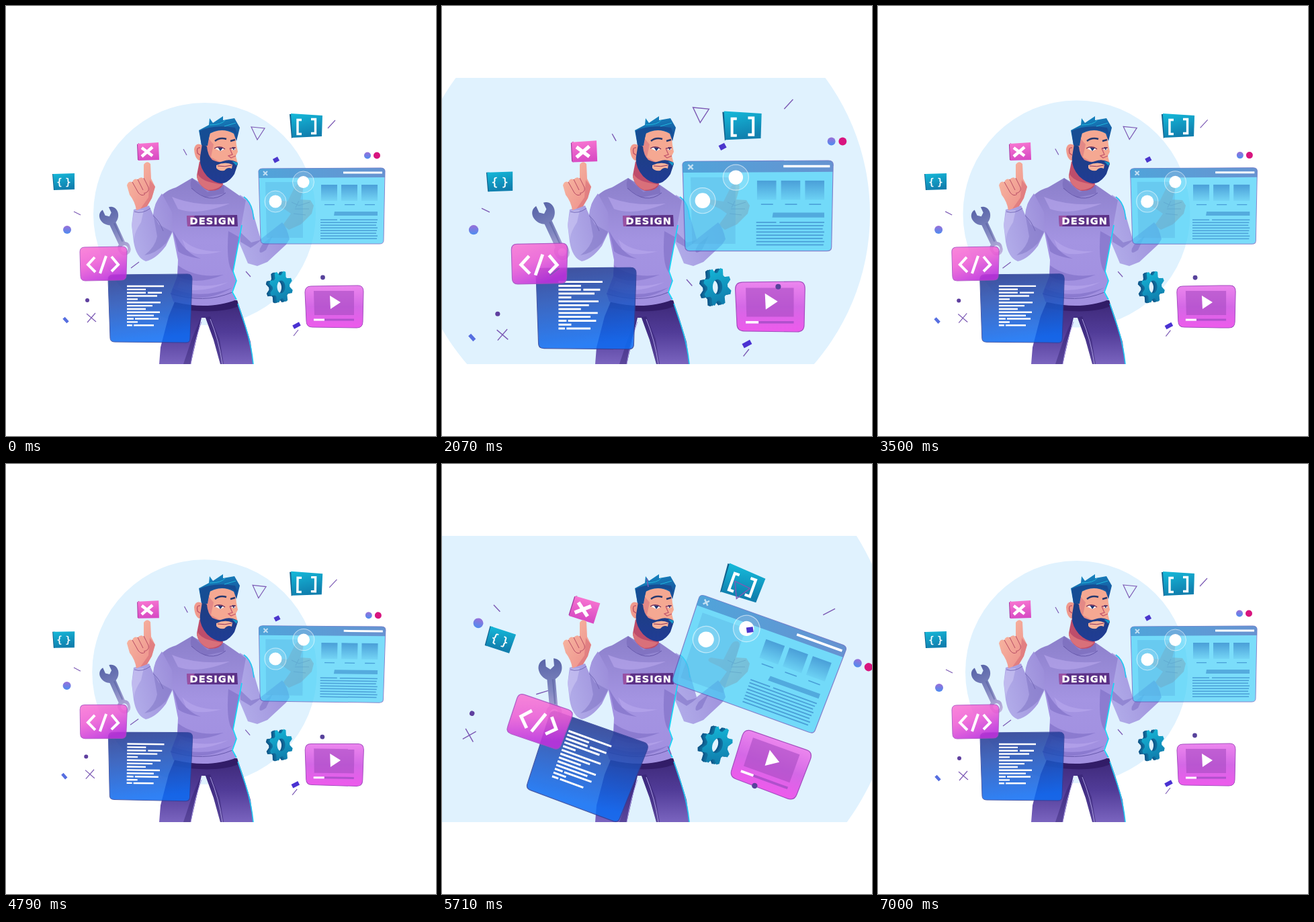
These frames come from a looping animation (640 px wide and 640 px high, 7210 ms). An HTML page:

```html
<!DOCTYPE html>
<html lang="en">
<head>
<meta charset="utf-8">
<title>Design</title>
<style>
html, body { margin: 0; width: 100%; height: 100%; overflow: hidden; background: #fff; }
svg { display: block; width: 100vw; height: 100vh; }
text { font-family: "DejaVu Sans", sans-serif; fill: #fff; }
.ln { fill: none; stroke: #7d5bb5; stroke-width: 1.2; }
.wh { fill: none; stroke: #fff; }
</style>
</head>
<body>
<svg viewBox="0 0 640 640">
<defs>
  <clipPath id="stage"><path d="M0 107H640V533H0Z"/></clipPath>
  <linearGradient id="sweater" x2="0" y2="1"><stop stop-color="#8b7fca"/><stop offset=".5" stop-color="#a494e2"/><stop offset="1" stop-color="#a18fe0"/></linearGradient>
  <linearGradient id="sleeve" x1="1" x2="0" y2=".4"><stop stop-color="#9a8bd9"/><stop offset="1" stop-color="#b0aae8"/></linearGradient>
  <linearGradient id="pants" x2="0" y2="1"><stop stop-color="#3c2776"/><stop offset=".5" stop-color="#513c98"/><stop offset="1" stop-color="#7a64bf"/></linearGradient>
  <linearGradient id="hair" x2=".4" y2="1"><stop stop-color="#1591c8"/><stop offset="1" stop-color="#174b96"/></linearGradient>
  <linearGradient id="beard" x2="0" y2="1"><stop stop-color="#1d3f82"/><stop offset="1" stop-color="#203c94"/></linearGradient>
  <linearGradient id="skin" x2="1" y2="1"><stop stop-color="#f9bda4"/><stop offset="1" stop-color="#ec8d8a"/></linearGradient>
  <linearGradient id="teal" x2=".3" y2="1"><stop stop-color="#15bada"/><stop offset="1" stop-color="#107fae"/></linearGradient>
  <linearGradient id="pink" x2=".2" y2="1"><stop stop-color="#fa79d2"/><stop offset="1" stop-color="#d94cc4"/></linearGradient>
  <linearGradient id="tag" x2=".5" y2="1"><stop stop-color="#fb78d4"/><stop offset=".5" stop-color="#ee5fd6"/><stop offset="1" stop-color="#c030dc"/></linearGradient>
  <linearGradient id="video" x2="0" y2="1"><stop stop-color="#ec86ee"/><stop offset=".5" stop-color="#d468e6"/><stop offset="1" stop-color="#ee5aec"/></linearGradient>
  <linearGradient id="code" x2=".15" y2="1"><stop stop-color="#24338a"/><stop offset=".45" stop-color="#2050b8"/><stop offset="1" stop-color="#0c6cf4"/></linearGradient>
  <linearGradient id="bar"><stop stop-color="#4a9ad4"/><stop offset="1" stop-color="#6486ca"/></linearGradient>
  <linearGradient id="thumb" x2="0" y2="1"><stop stop-color="#4a9fd8"/><stop offset="1" stop-color="#4a9fd8" stop-opacity=".15"/></linearGradient>
  <linearGradient id="steel" x2="0" y2="1"><stop stop-color="#5965a8"/><stop offset=".5" stop-color="#8087c0"/><stop offset="1" stop-color="#c3b4e0"/></linearGradient>
  <linearGradient id="ball" x2="0" y2="1"><stop stop-color="#9a6fd8"/><stop offset="1" stop-color="#4d8df0"/></linearGradient>
</defs>
<g clip-path="url(#stage)">
  <circle id="disc" cx="295.5" cy="309.5" fill="#e0f2fe"/>

  <g data-pivot="163.5 334.5">
    <g transform="translate(164 335) rotate(-25)">
      <path fill="url(#steel)" fill-rule="evenodd" d="M-5 -37V-28L0 -24L5 -28V-37C12 -36 15 -30 14 -24C13 -18 9 -14 5 -12L5 20C9 22 10 26 9 30A9 9 0 0 1 -9 30C-10 26 -9 22 -5 20V-12C-9 -14 -13 -18 -14 -24C-15 -30 -12 -36 -5 -37ZM0 24A5 5 0 1 0 .1 24Z"/>
      <path d="M2 -12V18" stroke="#565f9f" stroke-width="2" opacity=".5"/>
    </g>
  </g>

  <g data-pivot="211.5 217">
    <path fill="#a3379f" d="M195 206L198 204V230L196 229Z"/>
    <path fill="url(#pink)" d="M196 205L227 203L228 229L197 230Z"/>
    <path class="wh" stroke-width="4.5" d="M202 211L218 223M218 210L202 224"/>
  </g>

  <g id="man">
    <path fill="url(#pants)" d="M252 438L344 438L353 464L364 500L368 533H319L309 497L297 464H291L283 498L275 533H228L230 508L242 462Z"/>
    <path fill="#2f1a63" d="M251 440L344 438L346 447C318 458 278 455 249 449Z" opacity=".8"/>
    <path fill="#2c1b66" opacity=".4" d="M291 464L297 464L309 497L319 533H324L318 496L304 462ZM290 464L276 497L264 533H275L283 498Z"/>
    <path fill="none" stroke="#20c8f0" stroke-width="1.6" d="M345 443L356 476Q365 503 368 533"/>
    <path fill="none" stroke="#a99be0" d="M304 466Q317 498 322 533M291 470Q281 497 275 533"/>

    <path fill="url(#skin)" d="M412 326L424 309L414 302L399 295Q393 291 400 288L419 291L428 273Q433 262 440 264Q445 266 441 277L438 288L453 289L458 297L455 309L439 325L421 333Z"/>
    <path fill="none" stroke="#bd5968" d="M425 292L436 297L452 292M430 302L451 302M428 309L446 311M436 290L431 300"/>
    <path fill="url(#sleeve)" d="M348 281Q361 287 366 302L379 347L411 322Q418 329 422 347L417 355L389 381L374 387L360 383L347 352L340 312Z"/>
    <path fill="#796bc2" opacity=".5" d="M348 336L365 352L380 348L373 354L364 360L349 351ZM382 354L397 342L387 363Q375 372 378 361Z"/>
    <path fill="none" stroke="#20c8f0" stroke-width="1.6" d="M354 284Q363 290 367 305L369 318"/>

    <path fill="url(#sweater)" d="M277 256L253 270Q232 276 223 294L219 315L247 333L256 378L255 402L245 428L249 440C278 448 315 449 343 437L336 426L343 410L338 397L347 344L357 289Q340 277 324 266L309 275Z"/>
    <path fill="#7667bf" opacity=".5" d="M249 335Q267 369 290 376Q266 373 256 365ZM256 386Q283 406 324 400Q281 417 255 402ZM248 420Q289 438 337 419Q300 443 247 430ZM331 335L347 344L338 397Q327 385 331 335Z"/>
    <path fill="#b9a9ee" opacity=".6" d="M247 284Q283 299 333 294Q285 313 256 302ZM262 347Q282 367 321 365Q283 375 268 362ZM259 409Q290 423 331 411Q291 430 255 419Z"/>
    <path fill="#7b6dbd" d="M277 256Q273 264 276 272L297 285L325 279L324 266L300 277Z" opacity=".7"/>
    <path fill="none" stroke="#6658ab" d="M276 271Q303 297 327 278M245 428Q294 444 337 426"/>
    <path fill="none" stroke="#12d8f6" stroke-width="1.6" d="M351 326L338 395L343 409L337 426L343 437"/>

    <path fill="url(#sleeve)" d="M232 279Q220 294 219 311L213 297L190 303L187 326L190 351Q194 375 208 380Q223 377 238 357L248 336L247 307Z"/>
    <path fill="#7f74c4" opacity=".5" d="M219 309L227 325L247 336L238 353Q222 369 206 371Q222 359 225 343Z"/>
    <path fill="#cbc7f4" opacity=".6" d="M191 305L205 304L201 322Q189 340 191 350L187 326Z"/>
    <path fill="none" stroke="#766bb9" d="M191 306Q203 310 215 301M219 312Q228 319 234 335"/>

    <path fill="url(#skin)" d="M205 236Q210 229 215 235L216 257L222 269L217 286L210 298L194 304Q192 291 184 281L180 267Q182 260 188 262Q190 256 196 258Q201 253 205 257Z"/>
    <path fill="#d96f78" opacity=".6" d="M214 259L222 269L217 286L210 298L200 302L212 285Z"/>
    <path fill="none" stroke="#b84d66" d="M188 262L197 278M196 258L204 274M205 256L212 270Q214 277 205 279M197 278Q202 284 207 280"/>

    <path fill="#be4d6b" d="M288 231L284 252Q286 269 302 275Q318 276 323 266L321 252Z"/>
    <path fill="#d9707a" d="M285 250Q291 260 307 263L322 266Q314 274 301 274Q287 268 284 255Z"/>
    <path fill="#f09a8d" d="M292 207Q282 202 280 213Q281 230 291 231Z"/>
    <path fill="none" stroke="#bd5368" stroke-width="1.4" d="M289 211Q283 210 285 219L289 222"/>
    <path fill="#f5a892" d="M298 187Q318 179 341 188L343 207L345 217L342 223L345 235L337 252L317 253L295 234Z"/>
    <path fill="#d8717c" opacity=".55" d="M298 193L309 206L305 225L318 232L304 238L292 222Z"/>
    <path fill="url(#beard)" d="M292 205L299 209Q300 222 307 229Q317 234 323 231Q333 227 343 232L345 235L340 250Q331 264 320 264Q309 263 299 253Q287 239 289 224Z"/>
    <path fill="#f6b39a" d="M313 237Q326 231 337 236L336 242Q330 239 325 245Q316 246 313 241Z"/>
    <path fill="none" stroke="#8f335e" d="M315 238Q326 240 336 237"/>
    <path fill="#1599c8" d="M336 231L345 233L343 238Q340 234 336 231Z"/>
    <path fill="url(#hair)" d="M287 185L302 177L303 167L308 174L323 164L323 170L340 167L348 181L343 201L339 190Q325 182 310 187L303 190L300 208L291 207Z"/>
    <path fill="#164d94" d="M288 186Q308 176 341 181L345 194L338 187Q318 181 304 189L299 208L291 207Z"/>
    <path fill="none" stroke="#20b6dc" d="M303 177Q321 177 326 170M325 179L342 174"/>
    <path fill="none" stroke="#24376e" stroke-width="2.5" d="M311 201Q318 195 328 198M334 201L341 199"/>
    <path fill="#fff" d="M311 212Q318 207 325 213L319 216ZM334 212Q338 208 342 212L339 215Z"/>
    <path fill="#263873" d="M315 210L323 211L319 216ZM336 210H341L339 215Z"/>
    <path fill="none" stroke="#7c355d" stroke-width="1.3" d="M310 212Q318 207 326 213M333 212L342 211"/>
    <path fill="none" stroke="#c3566d" stroke-width="1.3" d="M333 212L337 221L331 223L335 226L342 223"/>

    <path fill="#5c3187" d="M269 312L344 311L345 328L270 328Z"/>
    <path fill="#b35eae" opacity=".7" d="M269 312L281 312L274 328H270Z"/>
    <text x="273.5" y="325.4" font-size="14.5" font-weight="bold" letter-spacing="1.1" stroke="#fff" stroke-width=".35">DESIGN</text>
  </g>

  <g data-pivot="446.5 178.5">
    <path fill="#12608c" d="M422 161L427 161L428 194L425 197Z"/>
    <path fill="url(#teal)" d="M424 160L471 163L470 194L426 196Z"/>
    <path class="wh" stroke-width="3.4" d="M440 169.5H434V190.500H440M454 168.500H460.500V189.500H454"/>
  </g>

  <g data-pivot="85.5 262">
    <path fill="#12608c" d="M69 250L73 250L73 274L71 274Z"/>
    <path fill="url(#teal)" d="M70 250L102 249V273L72 274Z"/>
    <text x="88" y="266.500" font-size="14" text-anchor="middle" letter-spacing="4" stroke="#fff" stroke-width=".4">{}</text>
  </g>

  <g data-pivot="469.5 298">
    <path fill="#44d0f8" opacity=".7" stroke="#5a52b8" d="M382 242L558 241Q565 241 564 248L562 349Q562 354 556 354H385Q379 354 379 348L376 248Q375 242 382 242Z"/>
    <path fill="url(#bar)" opacity=".85" d="M382 242L558 241Q565 241 564 248V255L376 256V248Q375 242 382 242Z"/>
    <path class="wh" stroke-width="2" opacity=".65" d="M383 246L389 252M389 246L383 252"/>
    <path class="wh" stroke-width="3" d="M502 248H560"/>
    <path fill="#55a9db" opacity=".32" d="M386 262H442V345H388Z"/>
    <g id="page"></g>
    <path fill="#4a9fd8" opacity=".8" d="M489 306H553V312H488Z"/>
    <g fill="#fff">
      <circle cx="442.5" cy="262" r="9"/><circle cx="401" cy="291" r="9.5"/>
      <g fill-opacity=".13" stroke="#fff" stroke-opacity=".55"><circle cx="442.5" cy="262" r="16"/><circle cx="401" cy="291" r="16"/></g>
    </g>
  </g>

  <g data-pivot="214.5 450">
    <path fill="url(#code)" opacity=".85" stroke="#2d3f98" d="M159 400L270 399Q277 399 277 406L274 495Q274 501 268 501L162 500Q155 500 155 494L152 407Q152 400 159 400Z"/>
    <path id="lines" class="wh" stroke-width="2.4"/>
  </g>

  <g data-pivot="145 383.5">
    <path fill="url(#tag)" opacity=".88" stroke="#a94bc1" d="M117 359L173 358Q180 358 180 365L179 401Q179 408 172 408L118 409Q111 409 111 402L110 366Q110 359 117 359Z"/>
    <path class="wh" stroke-width="4" d="M132 374L122 385L133 396M149 372L140 398M157 373L167 385L157 395"/>
  </g>

  <g data-pivot="489 447.5">
    <path fill="url(#video)" stroke="#a54fc0" d="M454 417L524 416Q532 416 532 425L531 470Q531 479 522 479L456 478Q447 478 447 469L445 426Q445 417 454 417Z"/>
    <path fill="#a94bc4" opacity=".6" d="M458 424H518V460H459Z"/>
    <path fill="#fff" d="M482 431L498 441L483 451Z"/>
    <path stroke="#b050cc" stroke-width="3" d="M474 467H518"/>
    <path class="wh" stroke-width="3" d="M458 467H474"/>
  </g>

  <g data-pivot="407 418" id="gear"></g>
  <g id="bits" data-pivot="320.5 332"></g>
</g>
</svg>
<script>
const $ = id => document.getElementById(id);
const box = (x, y, w, h, fill) => `<rect x="${x}" y="${y}" width="${w}" height="${h}" fill="${fill}"/>`;

// Web page mock-up inside the window
const INK = '#4a9fd8';
let page = box(468, 317.5, 25, 1.5, INK) + box(497, 317.5, 56, 1.5, INK);
for (const x of [469, 499, 529])
  page += box(x, 266, 24, 24, 'url(#thumb)') + box(x + 5, 295, 15, 1.3, INK);
for (let i = 1; i < 8; i++)
  page += box(468, 317.5 + i * 4, 85 - i % 3, 1.5, INK);
$('page').innerHTML = page;

// Code lines: one or two strokes per row
const rows = [[0, 55], [0, 28], [0, 28, 31, 52], [0, 45], [0, 16], [0, 50], [0, 38],
  [0, 28], [0, 49], [0, 40], [0, 10, 12, 47], [0, 16], [0, 8, 10, 40]];
$('lines').setAttribute('d', rows.map((row, i) => {
  let d = '';
  for (let j = 0; j < row.length; j += 2)
    d += `M${180 + row[j]} ${417 + i * 4.85}H${180 + row[j + 1]}`;
  return d;
}).join(''));

// Gear: eight teeth, turned a little towards the side
function gearPath(cx, cy) {
  const pts = [];
  for (let i = 0; i < 32; i++) {
    const a = (i + .5) / 32 * Math.PI * 2 + .1, r = i % 4 < 2 ? 24 : 17.5;
    pts.push(`${(cx + Math.cos(a) * r * .73).toFixed(1)} ${(cy + Math.sin(a) * r).toFixed(1)}`);
  }
  return `M${pts.join('L')}ZM${cx} ${cy - 9.5}a6 9.5 0 1 0 .1 0Z`;
}
$('gear').innerHTML = [[404, 419, '#0d5488'], [405.5, 418.7, '#0e6091'], [407, 418.4, '#0f6c9b'], [409.5, 418, 'url(#teal)']]
  .map(([x, y, fill]) => `<path fill="${fill}" fill-rule="evenodd" d="${gearPath(x, y)}"/>`).join('');

// Loose shapes around the figure
const dot = (x, y, r, fill) => `<circle cx="${x}" cy="${y}" r="${r}" fill="${fill}"/>`;
const chip = (x, y, w, h, turn, fill) =>
  `<g transform="translate(${x} ${y}) rotate(${turn})">${box(-w / 2, -h / 2, w, h, fill)}</g>`;
$('bits').innerHTML =
  '<path class="ln" d="M365 180L385 182L374 199ZM479 182L490 170M264 213L269 222M101 306L111 311M120 458L134 470M121 471L133 457M186 390L198 381M357 395L364 403M428 491L435 482"/>' +
  dot(538, 222.5, 5, 'url(#ball)') + dot(552, 222.5, 5, '#d8157f') +
  dot(91, 333, 6, 'url(#ball)') + dot(121, 438, 3, '#5f3f9f') + dot(471.5, 404, 3.4, '#57429b') +
  chip(402, 229, 8, 6.5, -28, '#4b36cc') + chip(89, 467.5, 9, 4.5, 48, '#566ee0') +
  chip(432.5, 475.5, 11, 6, -28, '#4a32d2');

const STEPS = 101, LOOP = 7210;
const clamp = x => Math.min(1, Math.max(0, x));
const ease = u => Math.sin(u * Math.PI / 2) ** 2;

// Rises from start to peak, falls back to zero at end
const pulse = (k, start, peak, end) =>
  clamp(k < peak ? (k - start) / (peak - start) : (end - k) / (end - peak));

const parts = [...document.querySelectorAll('[data-pivot]')]
  .map(el => [el, el.dataset.pivot.split(' ')]);

function draw(ms) {
  const k = Math.floor((ms % LOOP + 5) * STEPS / LOOP);
  const grow = pulse(k, 16, 36.7, 50), spin = pulse(k, 66, 84.8, 98);
  const p = ease(grow) + ease(spin);
  const turn = 12.5 * (spin + ease(spin));
  const scale = 1 + .275 * p;
  $('disc').setAttribute('r', 165.5 + 253 * p);
  for (const [el, [x, y]] of parts)
    el.setAttribute('transform', `translate(${x} ${y}) rotate(${turn}) scale(${scale}) translate(${-x} ${-y})`);
}

const begin = performance.now();
(function tick() {
  draw(performance.now() - begin);
  requestAnimationFrame(tick);
})();
</script>
</body>
</html>
```
